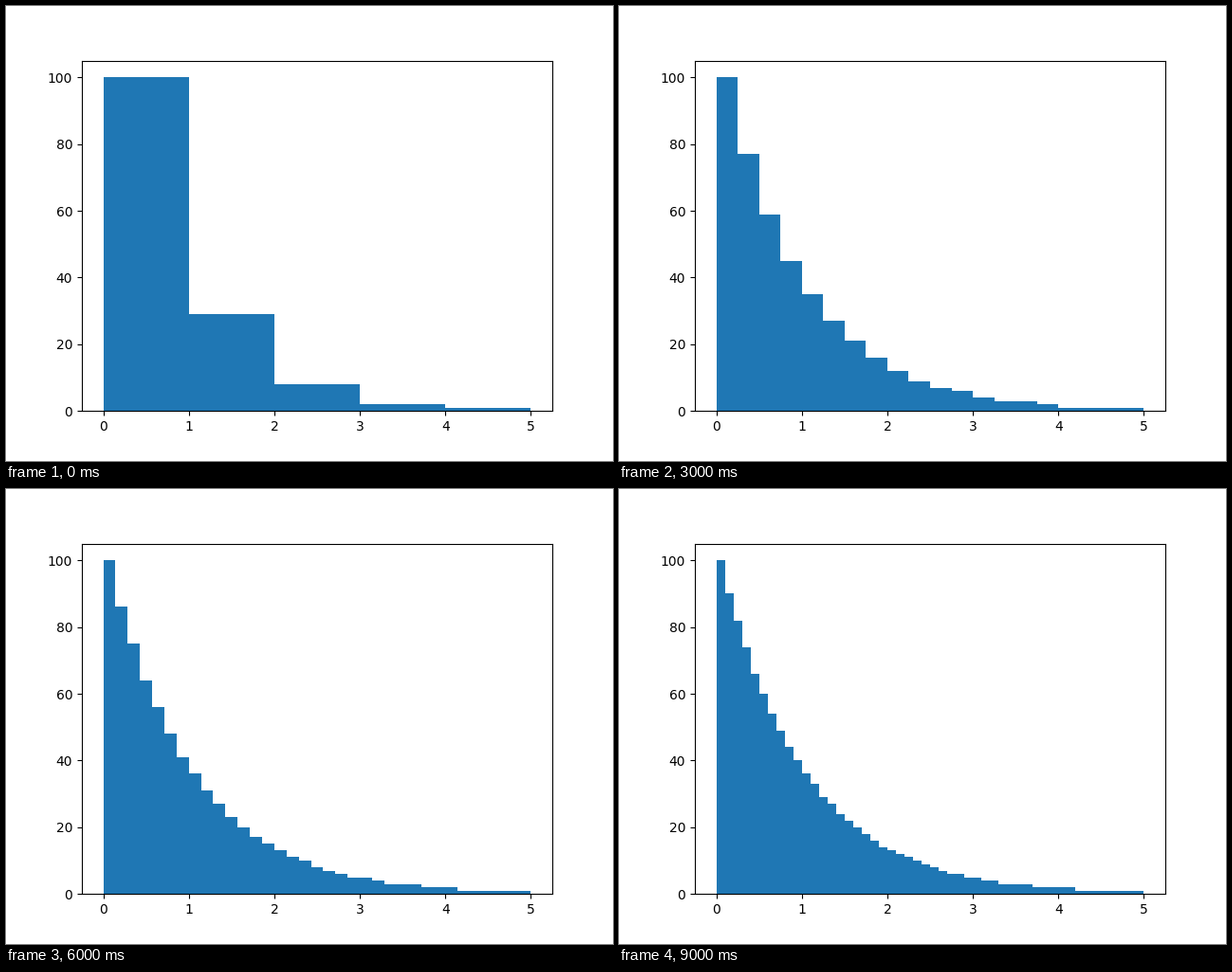
A matplotlib script for the animation above (10000 ms loop, 640x480 px).

```python
import numpy as np
import matplotlib.pyplot as plt
from matplotlib.animation import FuncAnimation

SPAN = 5
FRAMES = 10

fig, ax = plt.subplots(figsize=(6.4, 4.8), dpi=100)


def draw(frame):
    """Sampled exponential decay; each step adds five more bins."""
    bins = SPAN * (frame + 1)
    edges = np.linspace(0, SPAN, bins + 1)
    counts = np.round(100 * np.exp(-np.linspace(0, SPAN, bins)))
    ax.clear()
    return ax.hist(edges[:-1], bins=edges, weights=counts, color="#1f77b4")[2]


anim = FuncAnimation(fig, draw, frames=FRAMES, init_func=lambda: draw(0),
                     interval=1000, repeat=True, repeat_delay=0, blit=False)
plt.show()
```
